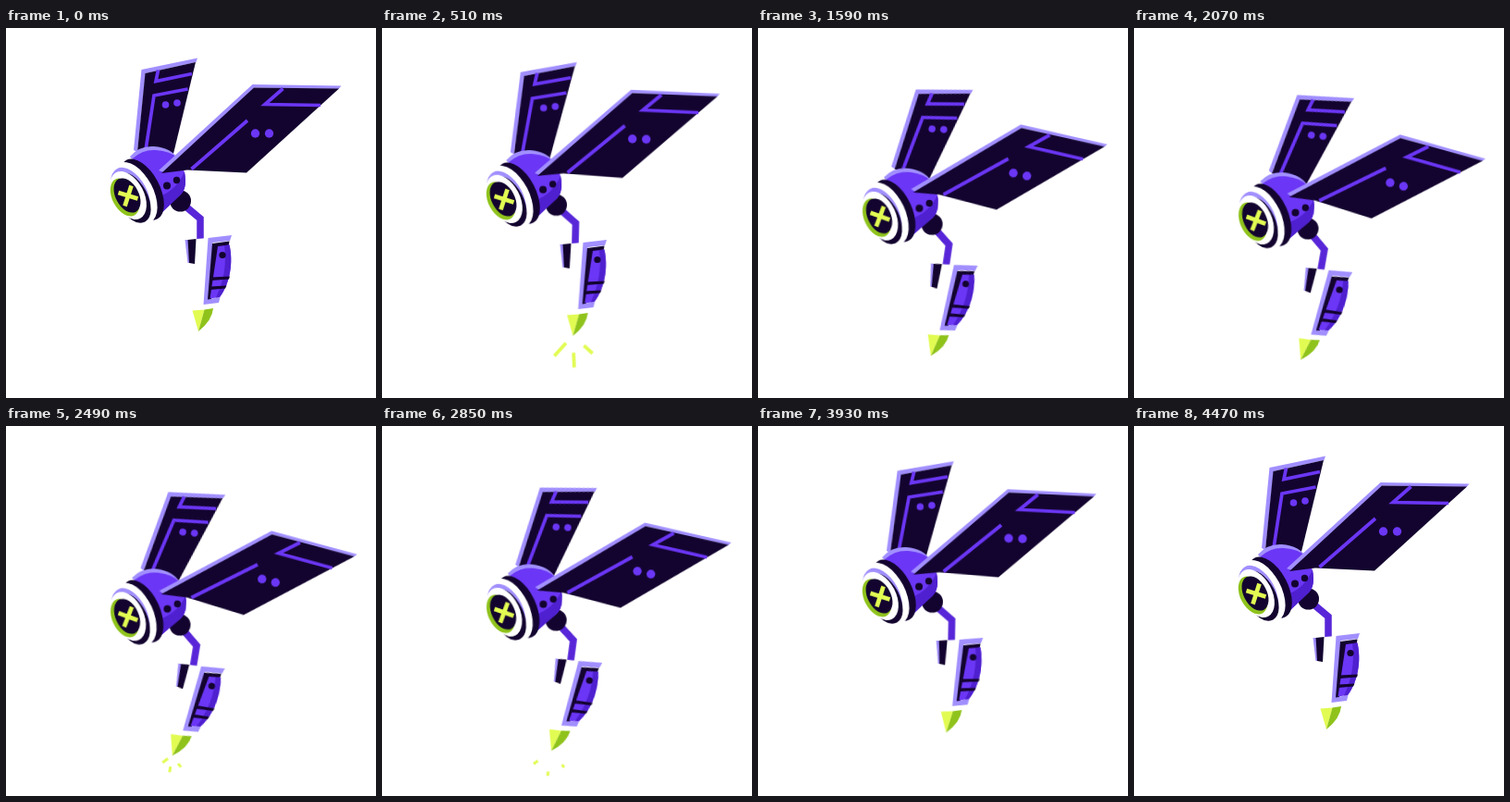
These frames come from a looping animation (400x400 px, 4500 ms). An HTML page:

```html
<!DOCTYPE html>
<html lang="en">
<head>
<meta charset="utf-8">
<title>Robot bee</title>
<style>
  html, body { margin: 0; width: 100%; height: 100%; overflow: hidden; background: #fff; }
  svg { display: block; width: 100%; height: 100%; }

  .ink { fill: #13042f; }
  .violet { fill: #6b36f5; }
  .shade { fill: #4f20cf; }
  .lilac { fill: #a18fff; }
  .white { fill: #fff; }
  .lime { fill: #e2fb52; }
  .green { fill: #8fc31c; }
  .line { fill: none; stroke: #6b36f5; stroke-width: 3.7; }

  /* one slow dip and return; the wings follow the body a little late */
  .dip { animation: dip 4.5s cubic-bezier(.33, 0, .67, 1) infinite; }
  .wing-l, .wing-r { --y: 26px; --a: 15.1deg; animation-delay: .07s; }
  .wing-l { transform-origin: 155px 160px; }
  .wing-r { transform-origin: 168px 156px; }
  .body { --y: 26.5px; --a: 3.5deg; transform-origin: 130px 180px; }
  .arm { --y: 0px; --a: 6.5deg; transform-origin: 188px 187px; }
  @keyframes dip {
    0% { transform: translateY(0) rotate(0deg); }
    47.5% { transform: translateY(var(--y)) rotate(var(--a)); }
    97.5%, 100% { transform: translateY(0) rotate(0deg); }
  }

  /* the stinger trails behind the arm */
  .sting { transform-origin: 210px 228px; animation: sway 4.5s cubic-bezier(.33, 0, .67, 1) infinite; }
  @keyframes sway {
    0%, 98%, 100% { transform: rotate(0deg); }
    16% { transform: rotate(-1.5deg); }
    69% { transform: rotate(3.5deg); }
  }

  /* streaks shoot out, then their tails catch up */
  .sparks {
    fill: none; stroke: #e2fb52; stroke-width: 3; stroke-dasharray: 10 12;
    transform-origin: 208px 328px; animation: spark 4.5s linear infinite;
  }
  @keyframes spark {
    0%, 5.6% { stroke-dashoffset: 11; transform: scale(1.25); }
    10% { stroke-dashoffset: 0; transform: scale(1.25); }
    18.9% { stroke-dashoffset: -11; transform: scale(1.25); }
    53.3% { stroke-dashoffset: -11; transform: scale(1); }
    57.8% { stroke-dashoffset: -22; transform: scale(1); }
    66.7%, 100% { stroke-dashoffset: -33; transform: scale(1); }
  }
</style>
</head>
<body>
<svg viewBox="0 0 400 400">
  <g class="dip wing-l">
    <path class="lilac" d="M138 132 146.500 45 207 32.500 205.500 37 151 49 142 134Z"/>
    <path class="ink" d="M142 134 150.500 49 205 37 180 140Z"/>
    <path class="line" d="M151 132 160 73 196.500 66M164.500 45.500 162 57.500 201 49.500"/>
    <circle class="violet" cx="172.500" cy="83" r="3.800"/>
    <circle class="violet" cx="185" cy="81" r="3.800"/>
  </g>

  <g class="dip body">
    <g class="dip arm">
      <path d="M192 191 210 206V230" fill="none" stroke="#5826d8" stroke-width="7.500"/>
      <g class="sting">
        <path class="white" d="M194 229 243 225 230 298 224 303 203 305Z"/>
        <path class="lilac" d="M193.500 229H197L198.500 254H196.500Z"/>
        <path class="ink" d="M196.500 229 205.500 228 204 255 198 254Z"/>
        <path class="lilac" d="M218.500 227 244 224 242 230 223.500 232 219 293 231.500 291 230 297 213.500 299Z"/>
        <path class="ink" d="M223 233 241.500 230.500 240.500 237 231 238 222 293 218 293.500Z"/>
        <path class="violet" d="M229 236 241.500 234.500C245.500 252 243 275 231 291L220.500 292.500Z"/>
        <path class="shade" d="M236 235 241.500 234.500C245.500 252 243 275 231 291L227 291.500Q240 264 236 235Z"/>
        <path class="ink" d="M222 269.500 242 268.500 241 271.500 222 273ZM221 279.500 238.500 278.500 237 281.500 221 283Z"/>
        <circle class="ink" cx="234" cy="245.500" r="3.600"/>
        <path class="lime" d="M201.500 305.500 214.500 304.500 208 328Z"/>
        <path class="green" d="M214.500 304.500 224 303Q223 316 208 328Z"/>
        <g class="sparks">
          <path pathLength="10" d="M204 332 192 345.400"/>
          <path pathLength="10" d="M208.500 340 209.200 355.300"/>
          <path pathLength="10" d="M216 335 225 343"/>
        </g>
      </g>
    </g>
    <circle class="ink" cx="188.500" cy="187" r="11.500"/>

    <path class="lilac" d="M134 139Q144 127 160 128 179 129 188 144L150 160Z"/>
    <path class="violet" d="M137 141Q148 131 162 132 178 133 186 141 194 152 194 166 194 175 189 180L160 207 148 170Z"/>
    <path class="shade" d="M166 182Q185 175 193 155 194 160 194 166 194 175 189 180L160 208Z"/>
    <circle class="ink" cx="174" cy="170.500" r="4"/>
    <circle class="ink" cx="184.500" cy="164.500" r="3.700"/>

    <!-- tilted rings, back to front -->
    <ellipse class="ink" cx="147" cy="174.500" rx="19" ry="36" transform="rotate(-28 147 174.500)"/>
    <ellipse class="white" cx="139.500" cy="178" rx="19.500" ry="36" transform="rotate(-28 139.500 178)"/>
    <ellipse class="lilac" cx="134.500" cy="179.500" rx="18" ry="31" transform="rotate(-28 134.500 179.500)"/>
    <ellipse class="ink" cx="136.500" cy="183.500" rx="16.500" ry="29.500" transform="rotate(-28 136.500 183.500)"/>
    <ellipse class="white" cx="132" cy="181" rx="17" ry="28" transform="rotate(-28 132 181)"/>
    <ellipse class="green" cx="128.500" cy="183" rx="13.500" ry="22" transform="rotate(-28 128.500 183)"/>
    <ellipse class="ink" cx="131" cy="181" rx="12.500" ry="20" transform="rotate(-28 131 181)"/>
    <path d="M121.500 178 142.500 184.500M135.500 170.500 128.500 192.500" stroke="#e2fb52" stroke-width="4.700"/>
  </g>

  <g class="dip wing-r">
    <path class="lilac" d="M165 154 266.500 61 362.500 62.500 359.500 66 268.500 64.500 170.500 156Z"/>
    <path class="ink" d="M168 157 268 64.500 360 65.500 260 156.500 196 153.500Z"/>
    <path class="line" d="M200.500 152.500 261 100M340 83.500 280 82.500 299.500 65.500"/>
    <circle class="violet" cx="269.500" cy="114" r="4.700"/>
    <circle class="violet" cx="284.500" cy="114" r="4.700"/>
  </g>
</svg>
</body>
</html>
```
